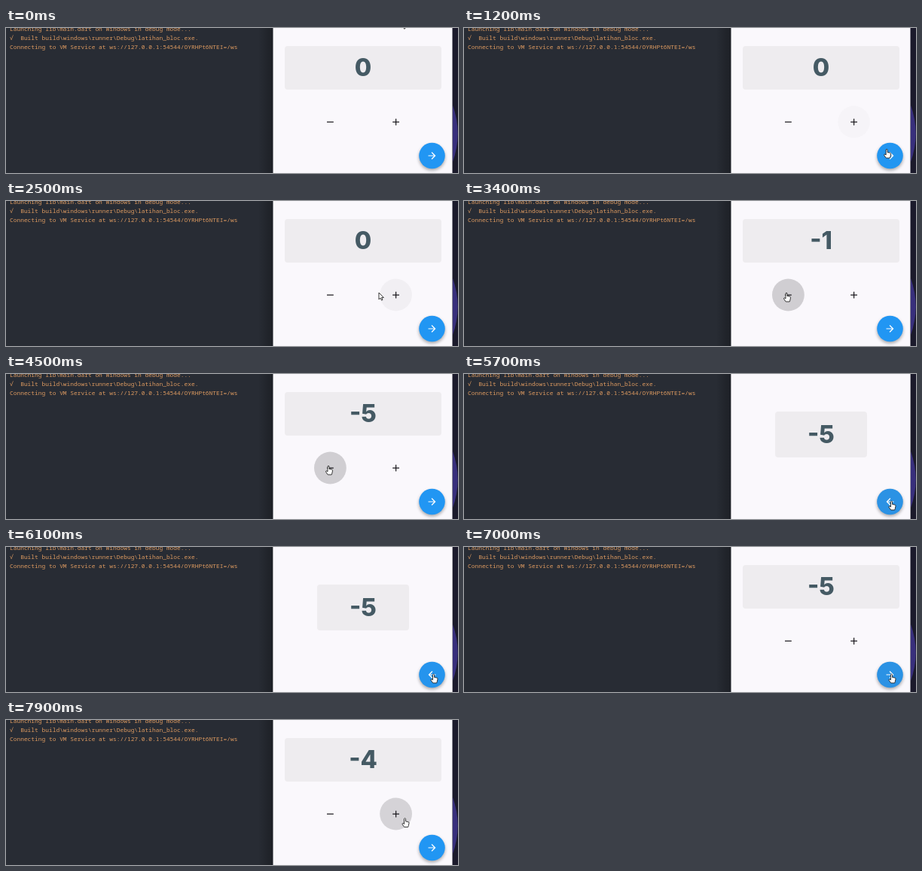
An HTML page that plays this animation: 600 px wide and 193 px high, repeating every 8 s.

```html
<!DOCTYPE html>
<html lang="en">
<head>
<meta charset="utf-8">
<title>Counter demo</title>
<style>
  html, body { margin: 0; width: 100%; height: 100%; overflow: hidden; background: #282c34; }
  svg { display: block; width: 100vw; height: 100vh; }
  .log text { font: 500 7.89px "Noto Sans Mono", "DejaVu Sans Mono", monospace; fill: #dd9a60; white-space: pre; }
  .count { font: 800 32.5px Inter, "Open Sans", sans-serif; fill: #455a64; text-anchor: middle; }
  .page { fill: #faf8fc; }
  .card { fill: #eeecef; }
  .icon { stroke: #1d1b20; stroke-width: 1.25; fill: none; }
  .cursor { fill: #fff; stroke: #222; stroke-width: .9; stroke-linejoin: round; }
</style>
</head>
<body>
<svg viewBox="0 0 600 193" preserveAspectRatio="none">
  <defs>
    <linearGradient id="edge">
      <stop offset="0" stop-color="#15171c" stop-opacity="0"/>
      <stop offset="1" stop-color="#15171c" stop-opacity=".6"/>
    </linearGradient>
    <clipPath id="window"><rect x="354.5" width="238" height="193"/></clipPath>
    <filter id="soft" x="-40%" y="-40%" width="180%" height="180%"><feGaussianBlur stdDeviation="2"/></filter>
  </defs>

  <rect width="600" height="193" fill="#282c34"/>
  <g class="log">
    <text x="5" y="4.3">Launching lib\main.dart on Windows in debug mode...</text>
    <text x="5" y="16.4">√  Built build\windows\runner\Debug\latihan_bloc.exe.</text>
    <text x="5" y="28.4">Connecting to VM Service at ws://127.0.0.1:54544/OYRHPt6NTEI=/ws</text>
  </g>
  <rect x="335" width="20" height="193" fill="url(#edge)"/>
  <rect x="592" width="8" height="193" fill="#1b1a2b"/>
  <path d="M593 103A111 111 0 0 1 593 178Z" fill="#382f7c"/>

  <g clip-path="url(#window)">
    <g id="home">
      <rect class="page" x="354" y="-70" width="239" height="267"/>
      <rect class="card" x="370" y="24" width="208" height="58" rx="4"/>
      <text class="count" x="474" y="64"></text>
      <circle id="minus" cx="430.4" cy="125" r="21.4"/>
      <circle id="plus" cx="517.6" cy="125" r="21.4"/>
      <path class="icon" d="M426 125.2h8.8M513.2 125.2h8.8M517.6 120.8v8.8"/>
    </g>
    <rect id="scrim" x="354" width="239" height="193"/>
    <g id="detail">
      <rect class="page" x="354" y="-70" width="239" height="267"/>
      <rect class="card" x="413" y="50" width="122" height="61" rx="4"/>
      <text class="count" x="474" y="92"></text>
    </g>
    <circle cx="565.5" cy="172.3" r="17.3" opacity=".33" filter="url(#soft)"/>
    <circle cx="565.5" cy="170" r="17.3" fill="#2196f3"/>
    <circle id="fab" cx="565.5" cy="170" r="17.3" fill="#777"/>
    <path id="arrow" fill="#fff" d="M0-8L-1.41-6.59 4.17-1H-8V1H4.17L-1.41 6.59 0 8 8 0z"/>
  </g>

  <g id="cursor" class="cursor">
    <path id="pointer" d="M0 0V9L2.1 7.2 3.6 10.2 5 9.5 3.6 6.6H6.4Z"/>
    <path id="hand" d="M-1 .9Q0-.6 1 .9V4.4L4.4 5.1Q5.6 5.4 5.5 6.7L4.8 10.2 4.2 12H-.8L-3.5 8.2Q-3.6 6.8-2.2 7L-1 8Z"/>
  </g>
</svg>
<script>
const LOOP = 8000, STEP = 100;
const PUSH = 5450, POP = 6750, TRANSITION = 300;
const HOVER = .05, PRESS = .12;

const $ = id => document.getElementById(id);
const clamp = v => Math.max(0, Math.min(1, v));
const mix = (a, b, p) => a + (b - a) * p;
const easeOut = (p, power) => 1 - (1 - p) ** power;

const entry = { x: 525, y: -9 };
const moves = [
  { from: 550, to: 800, x: 482, y: 62 },
  { from: 800, to: 1350, x: 567.5, y: 169 },
  { from: 1500, to: 2000, x: 512, y: 122 },
  { from: 2440, to: 3000, x: 428, y: 122 },
  { from: 4550, to: 5200, x: 567.5, y: 169 },
  { from: 7000, to: 7500, x: 529.5, y: 130.5 }
];

const clicks = {
  minus: Array.from({ length: 5 }, (_, i) => 3400 + 275 * i),
  plus: [7800],
  fab: [PUSH, POP]
};
const buttons = Object.keys(clicks);

const cursorAt = t => moves.reduce((pos, move) => {
  const p = easeOut(clamp((t - move.from) / (move.to - move.from)), 2);
  return { x: mix(pos.x, move.x, p), y: mix(pos.y, move.y, p) };
}, entry);

function isOver(id, t) {
  const { x, y } = cursorAt(t);
  const { cx, cy, r } = $(id);
  return Math.hypot(x - cx.baseVal.value, y - cy.baseVal.value) < r.baseVal.value;
}

// Hover fades over the last few steps; a press rises fast and fades slowly.
const hover = (id, t) => [0, 1, 2].filter(n => isOver(id, t - n * STEP)).length / 3;
const press = (id, t) => Math.max(...clicks[id].map(at =>
  clamp(Math.min((t - at) / 200 + 1, 1 - (t - at) / 600))));
const clicked = (id, t) => clicks[id].filter(at => at <= t).length;

const fade = (id, value) => $(id).setAttribute("opacity", value);
const place = (id, value) => $(id).setAttribute("transform", value);
const show = (id, on) => { $(id).style.display = on ? "" : "none"; };
const zoom = (id, s) => place(id, `translate(474 63) scale(${s}) translate(-474 -63)`);

function drawPages(t) {
  const push = clamp((t - PUSH) / TRANSITION), pop = clamp((t - POP) / TRANSITION);
  const inward = easeOut(push, 3), back = easeOut(pop, 3);
  const popping = t >= POP;
  zoom("home", popping ? mix(1.1, 1, back) : mix(1, 1.05, inward));
  zoom("detail", popping ? mix(1, .9, back) : mix(.85, 1, inward));
  fade("detail", popping ? 1 - clamp((pop - .08) / .125) : clamp((push - .125) / .125));
  fade("scrim", popping ? 0 : .6 * clamp((push - .2) / .2));
  const direction = t >= PUSH && !popping ? -1 : 1;
  place("arrow", `translate(565.5 170) scale(${.62 * direction} .62)`);
}

function drawCursor(t) {
  const { x, y } = cursorAt(t);
  const over = buttons.some(id => isOver(id, t));
  place("cursor", `translate(${x} ${y})`);
  show("hand", over);
  show("pointer", !over);
}

function draw(t) {
  const count = clicked("plus", t) - clicked("minus", t);
  document.querySelectorAll(".count").forEach(el => { el.textContent = count; });
  buttons.forEach(id => fade(id, HOVER * hover(id, t) + PRESS * press(id, t)));
  drawPages(t);
  drawCursor(t);
}

const start = performance.now();
function tick() {
  const t = (performance.now() - start) % LOOP;
  draw(Math.floor(t / STEP) * STEP);
  requestAnimationFrame(tick);
}
tick();
</script>
</body>
</html>
```
